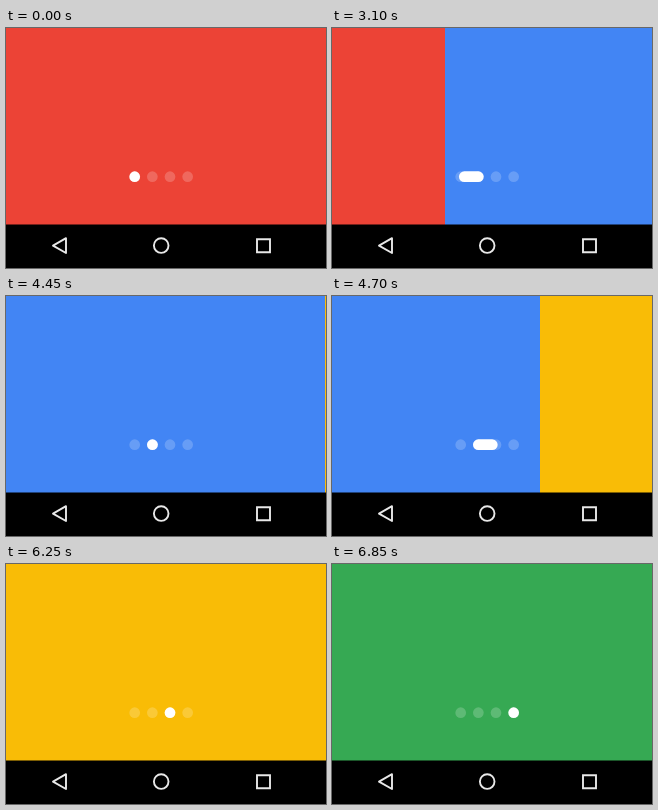
An HTML page for the animation above (8100 ms loop, 320 px wide and 240 px high).

```html
<!DOCTYPE html>
<html lang="en">
<head>
<meta charset="utf-8">
<title>Page indicator</title>
<style>
html, body { margin: 0; width: 100%; height: 100%; overflow: hidden; background: #000; }
svg { display: block; width: 320px; height: 240px; }
.ghost { fill: #fff; fill-opacity: .2; }
.nav { fill: none; stroke: #e8e8e8; stroke-width: 1.9; stroke-linejoin: round; }
</style>
</head>
<body>
<svg viewBox="0 0 320 240">
  <g id="pages">
    <rect width="320" height="197" fill="#ec4336"/>
    <rect x="320" width="320" height="197" fill="#4285f4"/>
    <rect x="640" width="320" height="197" fill="#f9bc06"/>
    <rect x="960" width="320" height="197" fill="#36a953"/>
  </g>
  <g class="ghost">
    <circle cx="128.7" cy="148.7" r="5.35"/>
    <circle cx="146.35" cy="148.7" r="5.35"/>
    <circle cx="164" cy="148.7" r="5.35"/>
    <circle cx="181.65" cy="148.7" r="5.35"/>
  </g>
  <rect id="worm" y="143.35" height="10.7" rx="5.35" fill="#fff"/>
  <rect y="196.5" width="320" height="43.5"/>
  <g class="nav">
    <path d="M60 210.2V225L47 217.6Z"/>
    <circle cx="155.2" cy="217.6" r="7.3"/>
    <path d="M251 211.2H264V224.2H251Z" stroke-linejoin="miter"/>
  </g>
</svg>
<script>
const LOOP = 8100, STEP = 50, WIDTH = 320;
const FIRST = 128.7, GAP = 17.65, RADIUS = 5.35;
const swipes = [
  { start: 2856, release: 3040, end: 3540, drag: .33 },
  { start: 4420, release: 4700, end: 5290, drag: .35 },
  { start: 6245, release: 6340, end: 6840, drag: .33 }
];
const pages = document.getElementById('pages');
const worm = document.getElementById('worm');

// A finger drag, then a quintic settle onto the next page.
function progress(t, { start, release, end, drag }) {
  if (t <= start) return 0;
  if (t >= end) return 1;
  if (t < release) return drag * ((t - start) / (release - start)) ** 2;
  return 1 - (1 - drag) * ((end - t) / (end - release)) ** 5;
}

function draw(now) {
  const t = Math.floor((now % LOOP) / STEP) * STEP;
  const pos = swipes.reduce((sum, s) => sum + progress(t, s), 0);
  const page = Math.floor(pos), p = pos - page;

  // The front edge stretches in the first half, the back edge follows.
  const lead = 1 - Math.max(0, 1 - 2 * p) ** 1.3;
  const trail = Math.max(0, 2 * p - 1) ** 1.3;
  const x = FIRST + page * GAP - RADIUS;

  pages.setAttribute('transform', `translate(${-Math.round(pos * WIDTH)} 0)`);
  worm.setAttribute('x', x + trail * GAP);
  worm.setAttribute('width', 2 * RADIUS + (lead - trail) * GAP);
}

const origin = performance.now();
function tick() {
  draw(performance.now() - origin);
  requestAnimationFrame(tick);
}
tick();
</script>
</body>
</html>
```
